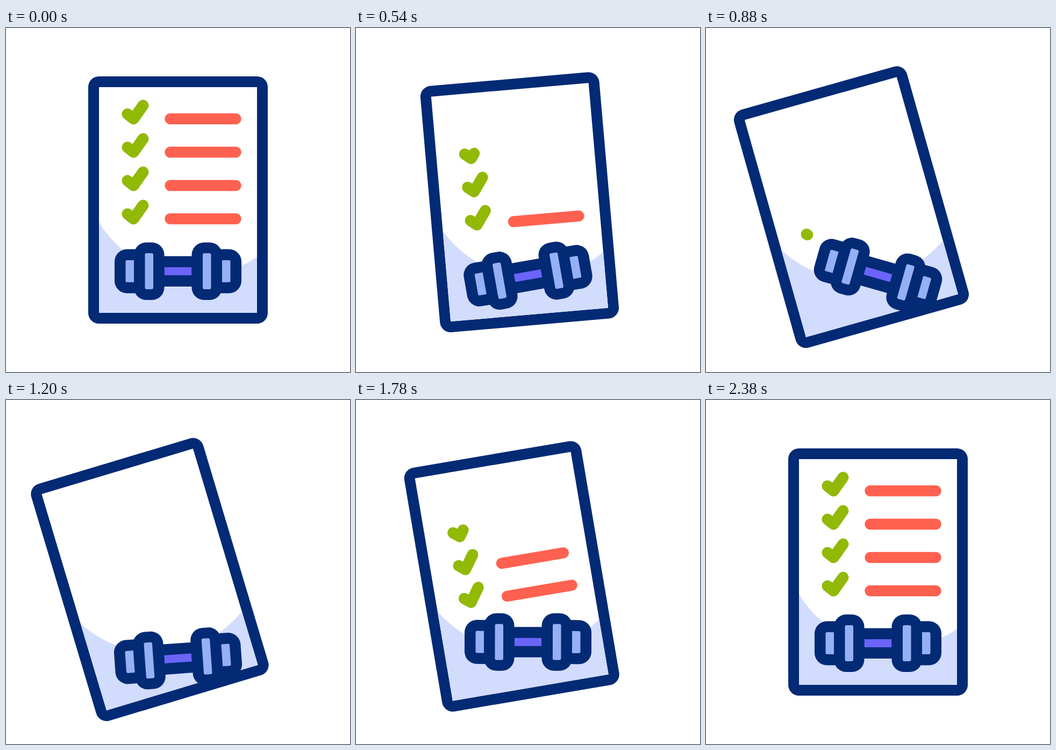
These frames come from a looping animation (640x640 px, 2400 ms). An HTML page:

```html
<!DOCTYPE html>
<html lang="en">
<head>
<meta charset="utf-8">
<title>Workout checklist</title>
<style>
  html, body { margin: 0; height: 100%; overflow: hidden; background: #fff; }
  svg { display: block; width: 100%; height: 100%; }
  .navy { fill: #032a75; }
  .steel { fill: #95b0f4; }
  .check, .line { fill: none; stroke-linecap: round; stroke-linejoin: round; }
  .check { stroke: #91b906; stroke-width: 21; }
  .line { stroke: #ff6150; stroke-width: 20.5; }
</style>
</head>
<body>
<svg viewBox="0 0 640 640">
  <g id="paper">
    <rect class="navy" x="153" y="90" width="334" height="460" rx="20"/>
    <rect x="173" y="110" width="294" height="420" fill="#fff"/>
    <path d="M173 361A206.5 206.5 0 0 0 467 426V530H173Z" fill="#d2dcfd"/>
    <g id="rows"></g>
  </g>
  <g id="dumbbell">
    <rect class="navy" x="-32" y="-28" width="64" height="56.5"/>
    <rect x="-25.5" y="-7.5" width="51" height="15" fill="#6b64f8"/>
    <g id="weights">
      <rect class="navy" x="-118" y="-41" width="60" height="82" rx="23"/>
      <rect class="steel" x="-97.5" y="-20.5" width="22" height="41" rx="2.5"/>
      <rect class="navy" x="-82" y="-53.5" width="56.5" height="107" rx="23"/>
      <rect class="steel" x="-61.5" y="-33.5" width="15.5" height="67" rx="3"/>
    </g>
    <use href="#weights" transform="scale(-1 1)"/>
  </g>
</svg>
<script>
const LOOP = 2400, HALF = LOOP / 2, ROWS = 4, STEP = 141;
const $ = id => document.getElementById(id);
const clamp = x => Math.min(1, Math.max(0, x));
const smooth = x => x * x * (3 - 2 * x);
const wave = x => (1 - Math.cos(Math.PI * x)) / 2;

// cubic-bezier(.8, 0, .2, 1)
function sharpEase(x) {
  let lo = 0, hi = 1;
  for (let i = 0; i < 24; i++) {
    const s = (lo + hi) / 2, r = 1 - s;
    if (2.4 * s * r * r + 0.6 * s * s * r + s * s * s < x) lo = s; else hi = s;
  }
  return smooth(lo);
}

// [time, value] pairs joined by half cosine waves
function swing(keys, t) {
  const i = keys.findIndex(([time]) => time > t);
  const [t0, v0] = keys[i - 1], [t1, v1] = keys[i];
  return v0 + (v1 - v0) * wave((t - t0) / (t1 - t0));
}

const lift = [[0, 0], [290, 60], [712, -20], [1070, 37], [1530, -10], [2000, 4], [LOOP, 0]];
const tilt = [[0, 0], [480, -11.7], [860, 16], [1220, -4.2], [1560, 0.3], [1900, 0], [LOOP, 0]];

function addStroke(className, d) {
  const path = document.createElementNS('http://www.w3.org/2000/svg', 'path');
  path.setAttribute('class', className);
  path.setAttribute('d', d);
  path.setAttribute('pathLength', 1);
  return $('rows').appendChild(path);
}

const rows = Array.from({ length: ROWS }, (_, i) => {
  const y = 62 * i;
  return {
    check: addStroke('check', `M226 ${160 + y}L237.3 ${169 + y}L255 ${144 + y}`),
    line: addStroke('line', `M305.5 ${169 + y}H427.5`)
  };
});

function trim(path, amount) {
  path.style.visibility = amount > 0.001 ? 'visible' : 'hidden';
  path.style.strokeDasharray = `${amount} 2`;
}

// Rows vanish from the top down and return from the bottom up
function shown(t, row, outStart, inStart) {
  const gone = smooth(clamp((t - outStart) / STEP - row));
  const back = smooth(clamp((t - inStart) / STEP - (ROWS - 1 - row)));
  return 1 - gone + back;
}

function draw(t) {
  const k = sharpEase(1 - Math.abs(t / HALF - 1));
  $('paper').setAttribute('transform',
    `translate(${-52.5 * k} ${14 * k}) rotate(${-16.7 * k} 320 320)`);
  $('dumbbell').setAttribute('transform',
    `translate(320 ${452.5 + swing(lift, t)}) rotate(${swing(tilt, t)})`);
  rows.forEach(({ check, line }, i) => {
    trim(line, shown(t, i, 117, 1517));
    trim(check, shown(t, i, 335, 1417));
  });
}

const start = performance.now();
function tick() {
  draw((performance.now() - start) % LOOP);
  requestAnimationFrame(tick);
}
tick();
</script>
</body>
</html>
```
